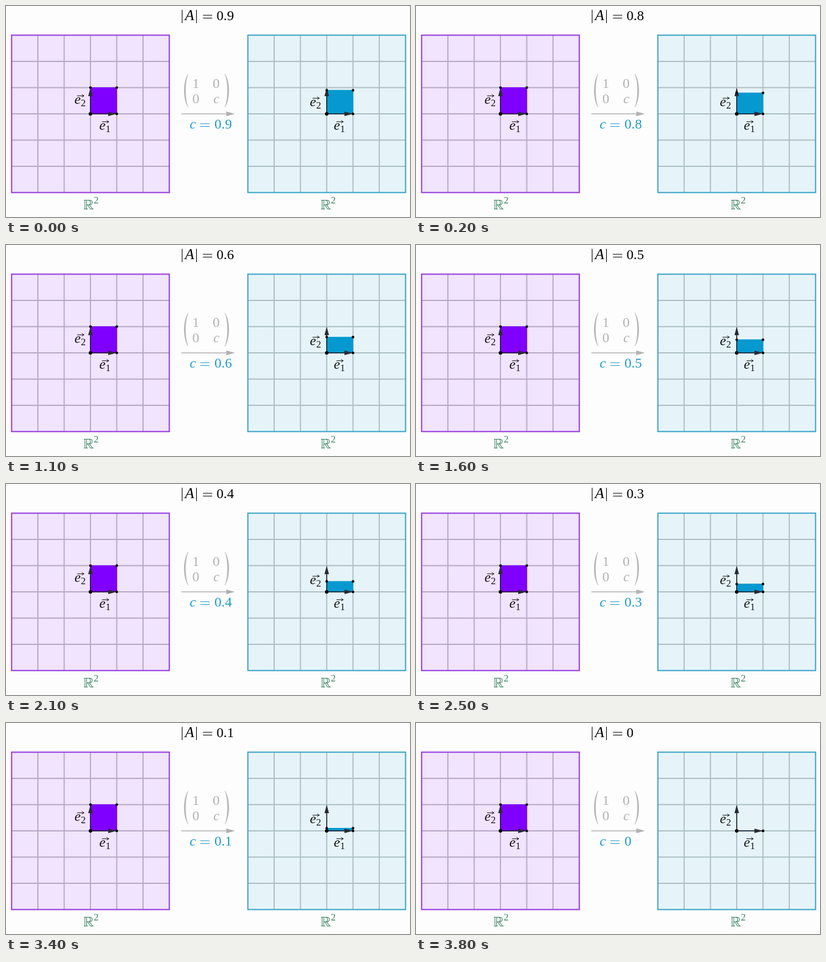
Recreate the animation shown at these times as an HTML page. Size 684 px wide and 358 px high, loop 4.2 s.

```html
<!DOCTYPE html>
<html lang="en">
<head>
<meta charset="utf-8">
<title>Determinant of a scaling matrix</title>
<style>
  html, body { margin: 0; width: 100%; height: 100%; overflow: hidden; background: #fdfdfd; }
  svg { display: block; width: 684px; height: 358px; }
  text { font: 23.5px "Liberation Serif", "Times New Roman", serif; }
  .it { font-style: italic; }
  .small { font-size: 16.5px; }
  .line { fill: none; stroke: currentColor; }
</style>
</head>
<body>
<svg id="stage" viewBox="0 0 684 358"></svg>
<script>
const LOOP = 4200, CELL = 44.5, TOP = 49.5, SIDE = 6 * CELL, BASE = 183;
// start time in ms and the value of c from then on
const STEPS = [[0, .9], [200, .8], [700, .7], [1100, .6], [1600, .5],
               [2100, .4], [2500, .3], [3000, .2], [3400, .1], [3800, 0]];
const stage = document.getElementById('stage');

function add(tag, attrs, parent = stage) {
  const el = document.createElementNS('http://www.w3.org/2000/svg', tag);
  for (const key in attrs) el.setAttribute(key, attrs[key]);
  parent.append(el);
  return el;
}

function text(x, y, str, attrs = {}, parent = stage) {
  const el = add('text', { x, y, fill: 'currentColor', ...attrs }, parent);
  el.textContent = str;
  return el;
}

function line(d, width, parent = stage) {
  return add('path', { d, class: 'line', 'stroke-width': width }, parent);
}

function group(color, x = 0, y = 0) {
  return add('g', { color, transform: `translate(${x} ${y})` });
}

function dot(cx, cy, r = 2.2) {
  return add('circle', { cx, cy, r, fill: '#000' });
}

function equals(x, y, parent) {
  line(`M${x} ${y - 8.2}h15.6m0 4.7h-15.6`, 1.1, parent);
}

function panel(x, look) {
  const { edge, back, grid, fill } = look;
  add('rect', { x, y: TOP, width: SIDE, height: SIDE, fill: back });
  let d = '';
  for (let i = 1; i < 6; i++)
    d += `M${x + i * CELL} ${TOP}v${SIDE}M${x} ${TOP + i * CELL}h${SIDE}`;
  line(d, 1.9, group(grid));
  add('rect', { x, y: TOP, width: SIDE, height: SIDE, fill: 'none', stroke: edge, 'stroke-width': 2 });

  const ox = x + 3 * CELL, tip = ox + CELL, up = BASE - CELL;
  const unit = add('rect', { x: ox, y: up, width: CELL, height: CELL, fill, stroke: fill });
  line(`M${ox} ${BASE}H${tip - 10}M${ox} ${BASE}V${up + 10}`, 1.5, group('#1c1c24'));
  add('path', {
    d: `M${tip} ${BASE}l-14.5 -3.8v7.6zM${ox} ${up}l-3.8 14.5h7.6z`,
    fill: '#2b2b33'
  });
  dot(ox, BASE, 3);
  dot(tip, BASE);
  return { unit, corners: [dot(ox, up), dot(tip, up)] };
}

function basis(x, y, index) {
  const g = group('#111', x, y);
  text(0, 0, 'e', { class: 'it' }, g);
  text(10.8, 3.5, index, { class: 'small' }, g);
  line('M4.5 -13.6h11.5m-3.4 -2.7q1 2.1 3.6 2.7q-2.6 .6 -3.6 2.7', 1, g);
}

function plane(x) {
  const g = group('#3a8263', x, 329);
  line('M.5 .5H10C16 .5 16 8.3 10 8.3H5M2.2 .5V15.5M5 .5V15.5M.5 15.5H7' +
       'M9 .5C12.3 2 12.3 7 9 8.3M6.5 8.3L11.5 15.5H16.7M9.5 8.3L15.2 15.5', 1.05, g);
  text(17, 6.3, '2', { class: 'small' }, g);
}

function matrix() {
  const g = group('#b2b2b2');
  const paren = (x, s) => add('path', {
    d: `M${x} 115c${-9 * s} 13 ${-9 * s} 44 0 57c${-6 * s} -14 ${-6 * s} -43 0 -57z`,
    fill: 'currentColor', stroke: 'currentColor', 'stroke-width': .4
  }, g);
  paren(308.5, 1);
  paren(370.5, -1);
  text(315.5, 139, '1', {}, g);
  text(350, 139, '0', {}, g);
  text(315.5, 165, '0', {}, g);
  text(351, 165, 'c', { class: 'it' }, g);
  line(`M297 ${BASE}H376`, 1.7, g);
  add('path', { d: `M387.5 ${BASE}l-14.5 -4v8z`, fill: 'currentColor' }, g);
}

panel(9.5, { edge: '#9436dc', back: '#f0e4fe', grid: '#b5a9c6', fill: '#7f00ff' });
const image = panel(409.5, { edge: '#35a3c8', back: '#e6f4fa', grid: '#adbfc3', fill: '#0599cf' });

basis(116, 166, '2');
basis(158, 210, '1');
basis(514.5, 170, '2');
basis(555, 210, '1');
plane(131.5);
plane(533);
matrix();

const det = group('#000');
line('M298.2 6.5V29M322.5 6.5V29', 1.1, det);
text(303, 24, 'A', { class: 'it', style: 'font-size:25.5px' }, det);
equals(333.5, 24, det);
const detValue = text(356.5, 24, '', {}, det);

const scale = group('#1c9bcb');
text(311, 208, 'c', { class: 'it' }, scale);
equals(329, 208, scale);
const scaleValue = text(353, 208, '', {}, scale);

function draw(now) {
  const t = now % LOOP;
  const c = STEPS.findLast(([start]) => start <= t)[1];
  const y = BASE - c * CELL;
  image.unit.setAttribute('y', y);
  // a zero-height rect is not painted, so keep a sliver
  image.unit.setAttribute('height', Math.max(c * CELL, .01));
  image.corners.forEach(p => p.setAttribute('cy', y));
  detValue.textContent = scaleValue.textContent = String(c);
}

function tick() {
  draw(performance.now());
  requestAnimationFrame(tick);
}
tick();
</script>
</body>
</html>
```
